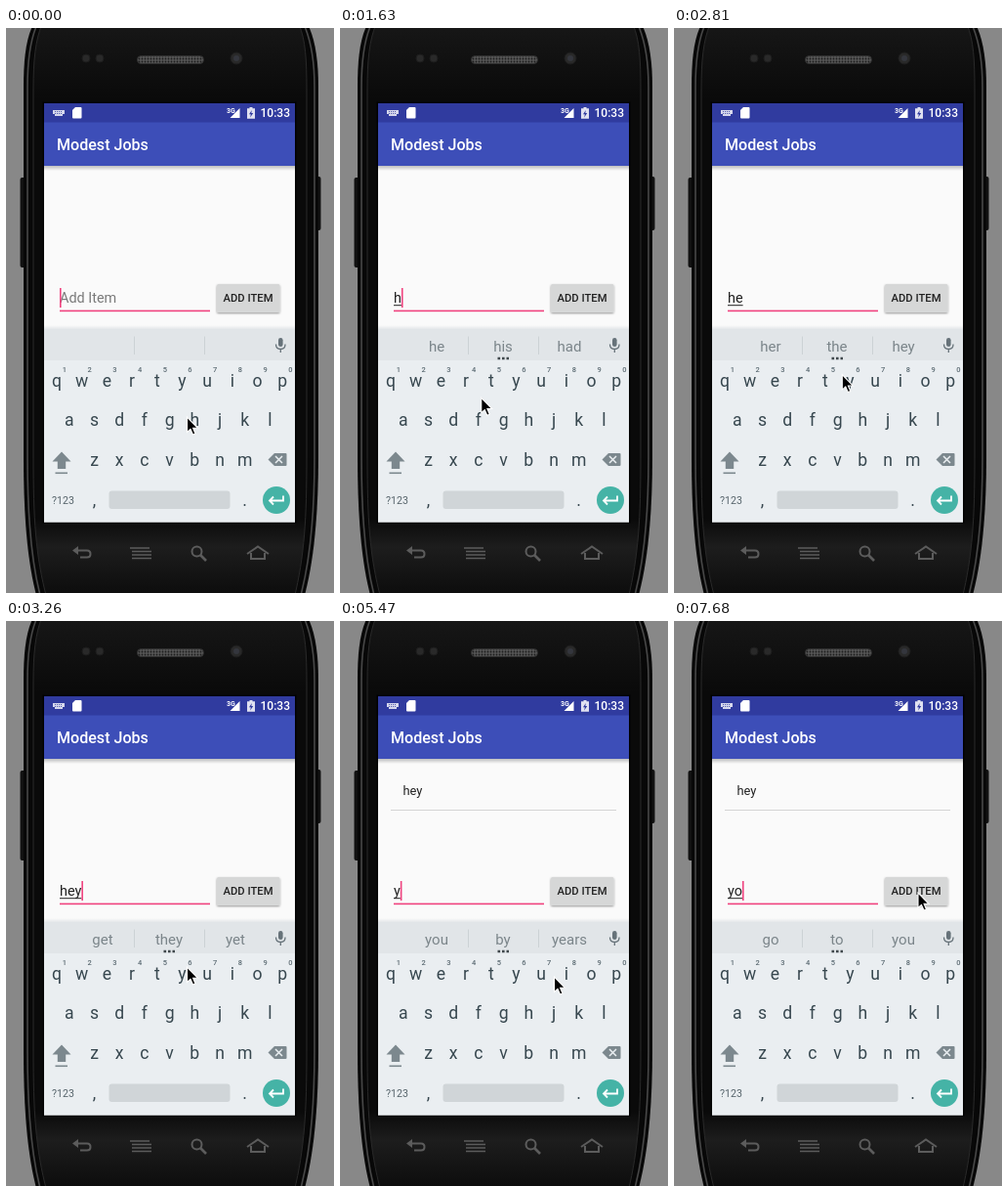
Animation of 336 by 578 pixels, one loop 8000 ms. Source, as an HTML page:

```html
<!DOCTYPE html>
<html lang="en">
<head>
<meta charset="utf-8">
<title>Todo app on a phone</title>
<style>
  html, body { margin: 0; width: 100%; height: 100%; overflow: hidden; background: #888; }
  svg { display: block; width: 336px; height: 578px; font-family: Roboto, "Liberation Sans", sans-serif; }
  .mid { text-anchor: middle; }
  .key { font-size: 17.6px; fill: #37474f; }
  .hint { font-size: 7.5px; font-weight: 500; fill: #5c6b73; }
  .word { font-size: 15px; fill: #7b858a; }
  .field { font-size: 14.45px; }
</style>
</head>
<body>
<svg viewBox="0 0 336 578" xmlns="http://www.w3.org/2000/svg">
  <defs>
    <linearGradient id="drop" x2="0" y2="1">
      <stop offset="0" stop-color="#000" stop-opacity=".24"/>
      <stop offset="1" stop-color="#000" stop-opacity="0"/>
    </linearGradient>
    <linearGradient id="rise" x2="0" y2="1">
      <stop offset="0" stop-color="#fafafa"/>
      <stop offset="1" stop-color="#dfe3e6"/>
    </linearGradient>
    <linearGradient id="glass" x2="0" y2="1">
      <stop offset="0" stop-color="#171717"/>
      <stop offset=".13" stop-color="#0a0a0a"/>
      <stop offset=".86" stop-color="#0a0a0a"/>
      <stop offset=".91" stop-color="#1d1d1d"/>
      <stop offset="1" stop-color="#0b0b0b"/>
    </linearGradient>
    <pattern id="mesh" width="3" height="3" patternUnits="userSpaceOnUse">
      <rect width="3" height="3" fill="#555"/>
      <circle cx="1.5" cy="1.5" r=".9" fill="#1d1d1d"/>
    </pattern>
    <filter id="soft" x="-20%" y="-20%" width="140%" height="140%">
      <feDropShadow dx="0" dy="1" stdDeviation="1" flood-opacity=".4"/>
    </filter>
  </defs>

  <!-- phone body -->
  <rect width="336" height="578" fill="#888"/>
  <rect x="14.5" y="153" width="6" height="92" rx="2" fill="#111"/>
  <rect x="317" y="152" width="5.5" height="55" rx="2" fill="#111"/>
  <path d="M28 -4C20 12 18 34 18 60V440C18 500 22 548 32 584H305C315 548 320 500 320 440V60C320 34 317 12 309 -4Z" fill="#080808"/>
  <path d="M32 -4C24 14 22 36 22 60V440C22 500 26 548 36 584M305 -4C313 14 316 36 316 60V440C316 500 311 548 301 584" fill="none" stroke="#484848" stroke-width="1.6"/>
  <path d="M37 -4C30 12 28 34 28 62V440C28 500 30 540 42 584H295C306 540 308 500 308 440V62C308 34 307 12 300 -4Z" fill="url(#glass)" stroke="#2a2a2a"/>
  <rect x="134.500" y="28.500" width="68" height="8" rx="4" fill="url(#mesh)" stroke="#303030"/>
  <g fill="#292929" stroke="#1e1e1e">
    <circle cx="82" cy="31" r="4"/><circle cx="96" cy="31" r="4"/>
    <circle cx="236" cy="31" r="6"/>
  </g>
  <circle cx="236" cy="31" r="3" fill="#34363d"/>
  <rect x="37.500" y="75.500" width="260" height="431" fill="#000"/>

  <!-- hardware keys -->
  <g fill="none" stroke="#5c5c5c" stroke-width="2">
    <path d="M73 534.500H83Q86.500 534.500 86.500 538T83 541.500H76"/>
    <path d="M68 534.500L74 530V539Z" fill="#5c5c5c" stroke="none"/>
    <path d="M127 532H147M129 535.500H149M129 539H149M129 542.500H149" stroke-width="1.6"/>
    <circle cx="195.500" cy="535.500" r="5"/><path d="M199 539L205 545" stroke-width="2.600"/>
    <path d="M247 538L258 530.500L269 538M251 537V543H265V537"/>
  </g>

  <!-- app -->
  <rect x="39" y="77" width="257" height="428.500" fill="#fafafa"/>
  <rect x="39" y="141" width="257" height="5" fill="url(#drop)"/>
  <rect x="39" y="96" width="257" height="45" fill="#3d4eb8"/>
  <rect x="39" y="77" width="257" height="19.500" fill="#303b9f"/>
  <g fill="#fff">
    <path d="M48 84H60V88H58V90H50V88H48Z" opacity=".8"/>
    <path d="M50 85.500H58M50 87.500H58" stroke="#303b9f" stroke-width=".8" stroke-dasharray="1 1"/>
    <path d="M71 81H76.500Q77.500 81 77.500 82V91.500Q77.500 92.500 76.500 92.500H69Q68 92.500 68 91.500V84Z"/>
    <path d="M239.500 82V92H229.500Z"/>
    <text x="226" y="86.500" font-size="7" font-weight="700">3G</text>
    <path d="M249.500 81H252.500V82.300H255V92.700H247V82.300H249.500Z" opacity=".85"/>
    <path d="M251.800 84L249 88.300H250.800L250.200 91.500L253.200 87H251.300Z" fill="#303b9f"/>
    <text x="260.500" y="91" font-size="12" font-weight="500">10:33</text>
    <text x="52" y="125" font-size="16.060" font-weight="500">Modest Jobs</text>
  </g>
  <g id="item">
    <text x="64.500" y="178" font-size="12.850" fill="#212121">hey</text>
    <rect x="52" y="193" width="231" height="1" fill="#d4d4d4"/>
  </g>
  <text id="hold" class="field" x="55" y="281" fill="#7a7a7a">Add Item</text>
  <text id="typed" class="field" x="55" y="281" fill="#212121"></text>
  <rect id="under" x="55" y="283.200" height="1" fill="#212121"/>
  <rect x="55" y="288.600" width="154" height="1.600" fill="#f0437f"/>
  <rect id="caret" y="266" width="1.600" height="20" fill="#f0437f"/>
  <rect x="216" y="262" width="64.500" height="29" rx="1.500" fill="#d6d7d7" filter="url(#soft)"/>
  <text class="mid" x="248" y="280.200" font-size="11.240" font-weight="500" fill="#212121">ADD ITEM</text>

  <!-- keyboard -->
  <rect x="39" y="304" width="257" height="5" fill="url(#rise)"/>
  <rect x="39" y="308" width="257" height="32" fill="#e1e5e8"/>
  <rect x="39" y="340" width="257" height="165.500" fill="#eaeef1"/>
  <path d="M131.500 315.500V334M203.500 315.500V334" stroke="#ccd2d5"/>
  <g id="words">
    <text class="mid word" x="99" y="331"></text>
    <text class="mid word" x="167" y="331"></text>
    <text class="mid word" x="235" y="331"></text>
    <path d="M161.500 338H173" stroke="#3f474b" stroke-width="2.400" stroke-dasharray="2.600 1.900"/>
  </g>
  <rect x="279" y="317" width="4.600" height="9" rx="2.300" fill="#667279"/>
  <path d="M276.500 323.500Q276.500 328.500 281.300 328.500T286 323.500M281.300 328.500V332" fill="none" stroke="#667279" stroke-width="1.300"/>
  <g id="keys"></g>
  <path d="M57 433.500L66.500 443.500H61.200V451H52.800V443.500H47.500Z" fill="#7c888e"/>
  <rect x="50.500" y="454.500" width="12.500" height="1.600" fill="#7c888e"/>
  <path d="M275 435H286.500Q287.500 435 287.500 436V447Q287.500 448 286.500 448H275L268.500 441.500Z" fill="#7c888e"/>
  <path d="M276 438L283 445M283 438L276 445" stroke="#eaeef1" stroke-width="1.500"/>
  <text class="mid" x="58.500" y="487" font-size="10.600" fill="#56646b">?123</text>
  <text class="mid key" x="90.500" y="489">,</text>
  <rect x="105.500" y="473.500" width="124" height="18.500" rx="3" fill="#d0d5d8"/>
  <text class="mid key" x="244.500" y="489">.</text>
  <circle cx="277" cy="483" r="14" fill="#45b3a6"/>
  <path d="M284 478.500V483.500H270.500M274 479.500L270 483.500L274 487.500" fill="none" stroke="#fff" stroke-width="1.800"/>

  <g id="popup">
    <rect width="39" rx="2" fill="#d1d6d8" filter="url(#soft)"/>
    <text class="mid" x="19.500" y="32.500" font-size="25.500" fill="#37474f"></text>
    <path d="M27.500 41.500H37.500" stroke="#9aa3a7" stroke-width="1.500" stroke-dasharray="1.800 2"/>
  </g>
  <path id="mouse" d="M0 0V15.500L3.500 12.300L6 18L8.500 17L6.100 11.300H11Z" fill="#000" stroke="#fff" stroke-width="1.100"/>
</svg>
<script>
const LOOP = 8000, STEP = 147.4, PITCH = 25.7;
const $ = id => document.getElementById(id);
const NS = "http://www.w3.org/2000/svg";

// Each entry: step at which it starts, then its value
const TEXT = [[0, ""], [8, "h"], [15, "he"], [21, "hey"], [27, ""], [36, "y"], [45, "yo"]];
const WORDS = [[0, ""], [9, "he his had"], [16, "her the hey"], [22, "get they yet"],
  [27, ""], [37, "you by years"], [45, "go to you"]];
const POPUP = [[0, ""], [7, "h"], [9, ""], [14, "e"], [16, ""], [20, "y"], [22, ""],
  [35, "y"], [37, ""], [44, "o"], [45, ""]];
const BLINK = [0, 1, 4, 6, 8, 12, 15, 19, 21, 25, 27, 31, 34, 40, 44, 49, 52];
const ITEM_STEP = 27;
const PATH = [[0, 185.5, 398], [6, 185.5, 398], [7, 188.5, 398.5], [9, 188.5, 398.5],
  [13, 101, 358], [16, 101, 358], [20, 185.5, 354], [22, 185.5, 354],
  [26, 233, 287], [31, 233, 287], [34, 184, 362], [36, 184, 362],
  [38, 255, 366], [39, 254.5, 367], [40, 254.5, 362], [43, 254.5, 362],
  [44, 258, 363], [46, 258, 363], [52, 250, 278]];

const keyPos = {};
function label(cls, x, y, str) {
  const el = document.createElementNS(NS, "text");
  el.setAttribute("class", "mid " + cls);
  el.setAttribute("x", x);
  el.setAttribute("y", y);
  el.textContent = str;
  $("keys").append(el);
}
[["qwertyuiop", 52, 367], ["asdfghjkl", 64.8, 407], ["zxcvbnm", 90.5, 448]].forEach(([row, x0, y], r) => {
  [...row].forEach((ch, i) => {
    const x = x0 + i * PITCH;
    keyPos[ch] = { x, row: r };
    label("key", x, y, ch);
    if (r === 0) label("hint", x + 8, 352, (i + 1) % 10);
  });
});

const latest = (list, k) => list.filter(e => e[0] <= k).pop()[1];
const show = (el, on) => el.setAttribute("visibility", on ? "visible" : "hidden");

function pointer(k) {
  const n = PATH.findIndex(p => p[0] > k);
  if (n < 0) return PATH[PATH.length - 1].slice(1);
  const [a, b] = [PATH[n - 1], PATH[n]];
  const u = (k - a[0]) / (b[0] - a[0]);
  const e = u * u * (3 - 2 * u);
  return [1, 2].map(i => a[i] + (b[i] - a[i]) * e);
}

function drawPopup(ch) {
  const box = $("popup");
  box.setAttribute("display", ch ? "inline" : "none");
  if (!ch) return;
  const { x, row } = keyPos[ch];
  const [rect, text, dots] = box.children;
  box.setAttribute("transform", `translate(${x - 19.5} ${row ? 329.5 : 293})`);
  rect.setAttribute("height", row ? 91 : 87.5);
  text.textContent = ch;
  show(dots, row === 0);
}

function draw(k) {
  const str = latest(TEXT, k), typed = $("typed");
  typed.textContent = str;
  const width = str ? typed.getComputedTextLength() : 0;
  $("under").setAttribute("width", width);
  show($("hold"), !str);
  $("caret").setAttribute("x", 55 + width);
  show($("caret"), BLINK.filter(s => s <= k).length % 2);
  show($("item"), k >= ITEM_STEP);

  const words = latest(WORDS, k).split(" ");
  const [a, b, c, dots] = $("words").children;
  [a, b, c].forEach((el, i) => { el.textContent = words[i] || ""; });
  show(dots, words.length > 1);

  drawPopup(latest(POPUP, k));
  $("mouse").setAttribute("transform", `translate(${pointer(k)})`);
}

function tick() {
  draw(Math.floor(performance.now() % LOOP / STEP));
  requestAnimationFrame(tick);
}
tick();
</script>
</body>
</html>
```
